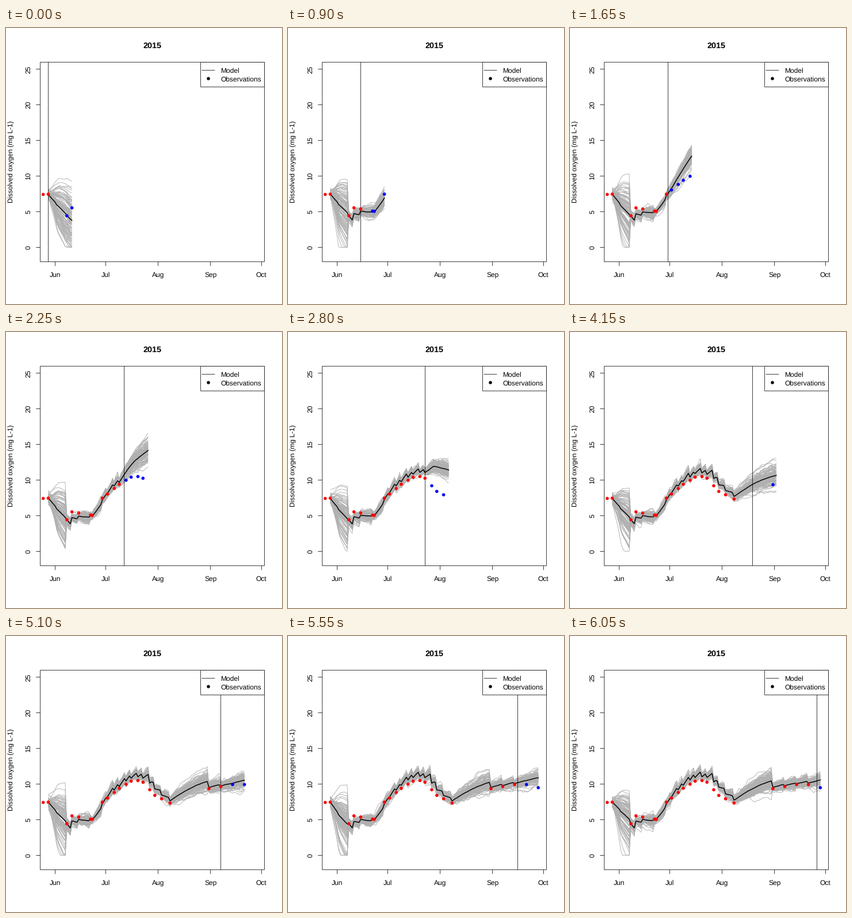
A matplotlib script that plays this animation: 480x480 px, repeating every 6100 ms.

```python
import numpy as np
import matplotlib.pyplot as plt
from matplotlib.animation import FuncAnimation
from matplotlib.collections import LineCollection

SIZE, DPI = 480, 100
PX = 72 / DPI                      # one pixel in points
THIN = 0.75 * PX
LEFT, RIGHT, TOP, BOTTOM = 59.5, 449.5, 59.5, 406.5
LAST, HORIZON, MEMBERS = 123, 14, 100
OBS_SD = 0.36
plt.rcParams["text.hinting"] = "none"


def curve(days, points):
    return np.interp(days, *zip(*points))


# Day 0 is 28 May; sampling is twice a week in summer, weekly in autumn
DAYS = np.array([-3, 0, 11, 14, 18, 25, 26]
                + [32 + 7 * k // 2 for k in range(11)]
                + [72] + list(range(95, LAST + 1, 7)))
OBS = curve(DAYS, [(-3, 7.42), (0, 7.46), (11, 4.43), (14, 5.54), (26, 5.04),
                   (32, 7.46), (42, 9.41), (49, 10.41), (53, 10.5),
                   (56, 10.26), (63, 8.41), (72, 7.34), (95, 9.36),
                   (109, 9.94), (116, 9.94), (123, 9.49)])
OBS_AT = dict(zip(DAYS, OBS))

# Daily change of the free-running model, and growth of the early fan
RATE = curve(np.arange(LAST), [(0, -.27), (3, -.27), (4, -.41), (5, -.22),
                               (12, -.29), (14, -.06), (25, 0), (26, .29),
                               (36, .4), (46, .35), (52, .19), (60, .17),
                               (61, -.03), (71, -.09), (72, .17), (97, .06)])
FAN = np.diff(curve(np.arange(LAST + 1),
                    [(0, 0), (3, .8), (5.5, 1.6), (10, 2.1), (14, 2.2)]))


def x_of(day):
    return 73.51 + 2.9413 * np.asarray(day)


def y_of(value):
    return 381.31 - 12.376 * np.asarray(value)


def crisp(v):
    return np.floor(v) + 0.5


def simulate(now):
    """Ensemble filter up to `now`, free forecast afterwards."""
    rng = np.random.default_rng(now + 100)
    z = rng.normal(size=MEMBERS)
    z -= .06 * (z ** 2 - 1)
    skill = rng.normal(1, .1, MEMBERS)
    state = rng.normal(OBS_AT[0], OBS_SD, MEMBERS)
    runs = [state]
    for day in range(1, min(now + HORIZON, LAST) + 1):
        noise = .05 if day <= 10 else .145
        state = (state + RATE[day - 1] * skill + FAN[day - 1] * z
                 + rng.normal(0, noise, MEMBERS))
        if day <= now and day in OBS_AT:
            var = state.var()
            gain = var / (var + OBS_SD ** 2)
            target = OBS_AT[day] + rng.normal(0, OBS_SD, MEMBERS)
            state = state + gain * (target - state)
        state = np.maximum(state, 0)
        runs.append(state)
    return np.array(runs)


fig = plt.figure(figsize=(SIZE / DPI, SIZE / DPI), dpi=DPI, facecolor="white")
ax = fig.add_axes([0, 0, 1, 1])
ax.set(xlim=(0, SIZE), ylim=(SIZE, 0))
ax.axis("off")


def line(xs, ys, z=6, width=THIN):
    return ax.plot(xs, ys, color="black", lw=width, zorder=z, snap=False,
                   solid_joinstyle="round")[0]


def label(x, y, text, size=12, ha="center", **kw):
    ax.text(x, y, text, fontsize=size * PX, family="Liberation Sans", ha=ha,
            va="baseline", rotation_mode="anchor", zorder=9, **kw)


def box(x0, y0, x1, y1, z, fill="none"):
    ax.add_patch(plt.Rectangle((x0, y0), x1 - x0, y1 - y0, facecolor=fill,
                               edgecolor="black", lw=THIN, zorder=z, snap=False))


box(LEFT, TOP, RIGHT, BOTTOM, 6)
for day, month in zip((4, 34, 65, 96, 126), ("Jun", "Jul", "Aug", "Sep", "Oct")):
    line([crisp(x_of(day))] * 2, [BOTTOM, BOTTOM + 7])
    label(x_of(day), 433, month)
for value in range(0, 26, 5):
    line([LEFT - 7, LEFT], [crisp(y_of(value))] * 2)
    label(42, y_of(value), str(value), rotation=90)
label(254.4, 35, "2015", size=14.4, weight="bold")
label(13, 233, "Dissolved oxygen (mg L-1)", rotation=90)

box(338.5, TOP, RIGHT, 102.5, 7, "white")
line([341, 363], [73.5, 73.5], 8)
ax.add_patch(plt.Circle((352, 88), 2.8, color="black", lw=0, zorder=8))
label(373.5, 78, "Model", ha="left")
label(373.5, 93, "Observations", ha="left")

members = LineCollection([], colors="#b0b0b0", linewidths=.9 * PX, zorder=2)
ax.add_collection(members)
mean = line([], [], 3, 1.5 * PX)
today = line([], [], 4)
dots = ax.scatter(x_of(DAYS), y_of(OBS), s=(5.6 * PX) ** 2, linewidths=0, zorder=5)


def dot_color(day, now):
    if day <= now:
        return "red"
    return "blue" if day <= now + HORIZON else "none"


def update(now):
    runs = simulate(now)
    xs = x_of(np.arange(len(runs)))
    members.set_segments([np.column_stack([xs, y_of(r)]) for r in runs.T])
    mean.set_data(xs, y_of(runs.mean(axis=1)))
    today.set_data([crisp(x_of(now))] * 2, [TOP, BOTTOM])
    dots.set_facecolor([dot_color(day, now) for day in DAYS])
    return members, mean, today, dots


anim = FuncAnimation(fig, update, frames=122, interval=50, repeat=True)
plt.show()
```
